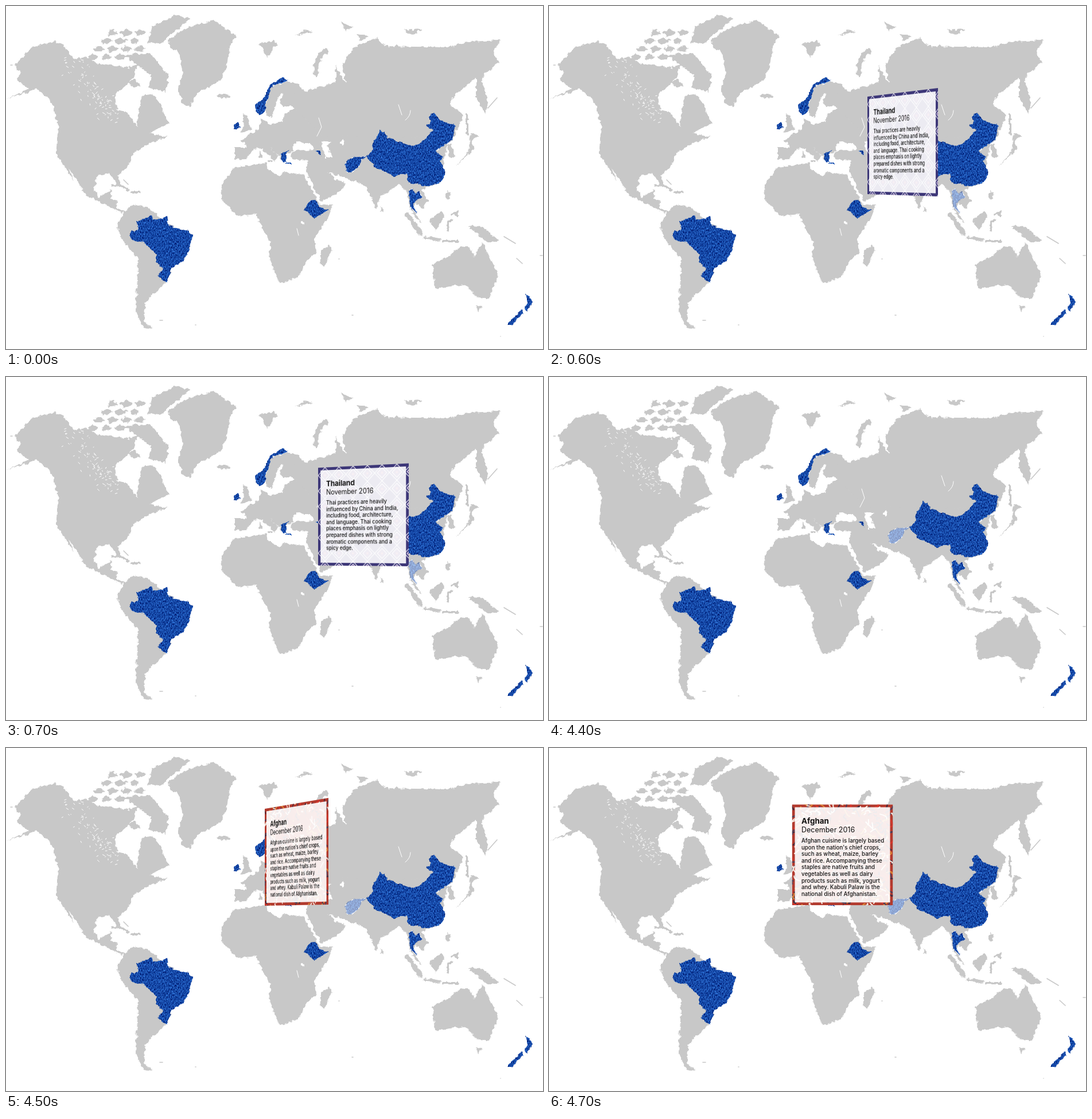
An HTML page for the animation above (8 s loop, 936 by 598 pixels).

```html
<!DOCTYPE html>
<html lang="en">
<head>
<meta charset="utf-8">
<title>World food map</title>
<style>
html, body { margin: 0; width: 100%; height: 100%; overflow: hidden; background: #fff; }
#stage { position: relative; width: 936px; height: 598px; overflow: hidden; }
#map, .card svg { position: absolute; left: 0; top: 0; width: 100%; height: 100%; }
.land { fill: #c8c8c8; }
.strip { fill: none; stroke: #c8c8c8; stroke-linecap: round; stroke-linejoin: round; }
.line { fill: none; stroke: #fff; stroke-linecap: round; }

.card {
  position: absolute; left: 0; top: 0; width: 176px; height: 176px;
  overflow: hidden; transform-origin: 0 0; opacity: 0;
  font-family: Inter, Roboto, sans-serif; color: #111;
}
.card div { position: absolute; left: 16.5px; top: 21px; white-space: nowrap; }
.card h2, .card h3, .card p { margin: 0; line-height: 16px; }
.card h2 { font-size: 13.4px; }
.card h3 { font-size: 12.5px; font-weight: 400; }
.card p { font-size: 9.7px; line-height: 11.6px; font-weight: 500; padding-top: 5px; }

#thai { animation: thai 8s step-end infinite; }
#afghan { animation: afghan 8s step-end infinite; }
#th { animation: fadeThai 8s step-end infinite; }
#af { animation: fadeAfghan 8s step-end infinite; }

@keyframes thai {
  0% { opacity: 0; }
  7.5% { opacity: 1; transform: var(--narrow); }
  8.75% { opacity: 1; transform: var(--wide); }
  10% { opacity: 1; transform: translate(532px, 153.5px); }
  55%, 100% { opacity: 0; }
}
@keyframes afghan {
  0% { opacity: 0; }
  56.25% { opacity: 1; transform: var(--narrow); }
  57.5% { opacity: 1; transform: var(--wide); }
  58.75%, 100% { opacity: 1; transform: translate(423.5px, 98.3px); }
}
@keyframes fadeThai { 0% { opacity: 1; } 6.25% { opacity: .48; } 55%, 100% { opacity: 1; } }
@keyframes fadeAfghan { 0% { opacity: 1; } 55%, 100% { opacity: .48; } }
</style>
</head>
<body>
<div id="stage">
<svg id="map" viewBox="0 0 936 598">
<defs>
  <filter id="coast" filterUnits="userSpaceOnUse" x="0" y="0" width="936" height="598" color-interpolation-filters="sRGB">
    <feTurbulence type="fractalNoise" baseFrequency=".14" numOctaves="2" seed="4" result="t"/>
    <feComponentTransfer result="n"><feFuncA type="discrete" tableValues="1"/></feComponentTransfer>
    <feDisplacementMap in="SourceGraphic" in2="n" scale="8" xChannelSelector="R" yChannelSelector="G"/>
  </filter>
  <filter id="denim" filterUnits="userSpaceOnUse" x="0" y="0" width="936" height="598" color-interpolation-filters="sRGB">
    <feTurbulence type="fractalNoise" baseFrequency=".14" numOctaves="2" seed="4"/>
    <feComponentTransfer result="n"><feFuncA type="discrete" tableValues="1"/></feComponentTransfer>
    <feDisplacementMap in="SourceGraphic" in2="n" scale="6" xChannelSelector="R" yChannelSelector="G" result="shape"/>
    <feTurbulence type="fractalNoise" baseFrequency=".75 .3" numOctaves="2" seed="9"/>
    <feColorMatrix values=".45 0 0 0 -.14  .75 0 0 0 -.09  .85 0 0 0 .23  0 0 0 0 1"/>
    <feComposite in2="shape" operator="in"/>
  </filter>
  <path id="thShape" d="M702 322L708 318 714 328 721 324 726 334 714 338 709 347 716 362 706 352Z"/>
  <path id="afShape" d="M591 274L604 264 628 262 619 268 616 279 604 290 594 290Z"/>
</defs>

<g class="land" filter="url(#coast)">
  <!-- North America -->
  <path d="M0 162L40 145 18 128 26 118 14 104 45 72 84 62 105 72 117 93 140 88 156 99 213 107 230 100 222 125 190 155 192 177 216 190 228 210 231 180 237 156 254 152 270 172 283 205 250 221 282 228 243 243 222 256 212 280 195 296 200 312 195 316 188 300 180 292 158 297 154 320 162 333 184 321 182 336 194 342 193 352 210 358 200 360 140 330 109 281 119 305 87 258 91 208 80 168 55 144Z"/>
  <!-- Arctic islands -->
  <path d="M255 36L296 16 322 22 286 50 272 65 246 64Z"/>
  <path d="M205 86L252 82 284 122 278 150 248 142 254 122 226 100Z"/>
  <path id="isles"/>
  <path d="M284 57L320 36 362 25 402 52 390 70 384 108 374 130 332 153 320 177 308 170 300 145 308 118 302 82 285 70Z"/>
  <ellipse cx="379" cy="157" rx="12" ry="5"/>
  <!-- South America -->
  <path d="M206 358L222 346 248 351 284 382 326 400 314 432 310 442 292 454 276 484 266 496 251 506 242 522 241 550 257 563 238 560 226 530 231 440 208 416 193 385Z"/>
  <!-- Africa -->
  <path d="M398 281L454 274 457 286 476 296 486 290 518 294 548 347 570 346 562 368 537 404 540 428 524 446 508 474 477 483 458 438 462 416 448 390 436 363 402 366 374 334 376 312Z"/>
  <path d="M564 416L567 426 555 455 546 448 549 428Z"/>
  <!-- Europe -->
  <path d="M399 246L420 246 410 233 440 214 446 196 458 206 482 202 486 188 540 160 620 200 580 250 548 252 530 240 504 238 502 252 488 259 487 273 458 245 475 262 468 270 446 248 432 250 418 267 399 268Z"/>
  <path d="M412 187L420 190 428 214 408 222 415 210Z"/>
  <path d="M452 176L456 192 464 194 474 160 485 150 476 166 482 175 530 170 510 136 490 131 462 142Z"/>
  <!-- Russia -->
  <path d="M500 176L500 152 516 146 508 138 520 149 576 132 574 104 592 134 586 102 608 72 646 56 662 70 772 72 806 62 860 60 850 80 858 98 829 124 840 172 835 188 820 160 820 124 778 160 774 172 797 190 778 234 700 262 560 235Z"/>
  <!-- Southern Asia -->
  <path d="M496 257L560 225 770 230 756 308 724 320 736 338 726 353 715 343 710 354 724 380 709 364 700 328 686 310 652 332 645 354 626 312 561 289 576 303 592 309 576 328 550 341 523 289 526 270 498 266Z"/>
  <path d="M768 242L775 240 784 261 774 266ZM810 222L825 226 811 234 815 250 784 278 806 254ZM655 349L658 358 653 360Z"/>
  <!-- South-east -->
  <path d="M738 373L758 358 764 366 750 392ZM767 322L775 324 773 338 767 334ZM775 362L788 357 787 368Z"/>
  <path d="M805 383L832 386 862 411 838 411Z"/>
  <!-- Australia -->
  <path d="M744 450L772 436 794 418 806 420 816 436 830 412 858 468 842 510 824 510 800 486 748 492Z"/>
  <path d="M820 522L830 523 823 534Z"/>
  <!-- Northern seas -->
  <path d="M442 66L468 59 472 66 455 91ZM584 27L606 38 592 43ZM611 49L632 52 619 61ZM693 42L728 40 706 50ZM502 52L520 42 534 44Z"/>
  <g class="strip">
    <path stroke-width="8" d="M557 79Q537 92 541 118M700 364L723 396"/>
    <path stroke-width="4" d="M184 313Q196 310 214 321M220 325h11M728 403L756 408M770 392V375h8M804 190V222M762 410h26M443 256v7M458 270h5"/>
  </g>
</g>

<g fill="#fff" filter="url(#coast)">
  <path d="M498 246L506 237 530 240 537 250 502 252Z"/>
  <path d="M550 236L566 238 561 244 568 264 556 264Z"/>
  <circle cx="585" cy="238" r="3"/><circle cx="517" cy="378" r="3"/><circle cx="751" cy="249" r="4"/>
</g>
<path class="line" d="M684 172l6 18M696 199Q705 192 705 182M545 195l5 16 -8 16M507 388l3 12"/>
<path id="lakes" class="line"/>
<path class="strip" stroke-width="1.6" d="M8 103h3M603 539h2M268 548h5M330 556h1M580 441h1M862 576h0M931 435h4M890 440l10 9M868 402l20 12M205 303l8 8M840 178l16 -18"/>

<use href="#thShape" fill="#fff"/>
<use href="#afShape" fill="#fff"/>
<g filter="url(#denim)">
  <path d="M215 402L220 392 230 390 228 376 252 365 256 374 280 368 284 384 318 392 326 400 315 434 310 444 290 456 279 482 264 470 274 458 262 446 262 432 240 412 220 408Z"/>
  <path d="M435 182L434 172 448 162 462 136 482 125 492 130 464 140 453 168 452 184 440 191Z"/>
  <path d="M628 262L640 250 638 240 654 216 666 230 706 244 722 240 744 216 732 208 740 204 738 192 746 186 758 200 784 208 778 232 748 254 762 263 756 270 767 290 756 308 734 315 702 308 698 292 678 297 644 282Z"/>
  <path d="M520 356L530 338 540 337 548 352 562 356 538 370Z"/>
  <path d="M397 207L405 202 408 212 398 216ZM540 252L546 252 550 260ZM478 258L495 251 487 259 489 272 483 273ZM488 274h8v2h-8z"/>
  <path d="M906 500L918 516 907 534 903 528 909 518ZM898 529L902 535 882 556 873 556Z"/>
  <use id="th" href="#thShape"/>
  <use id="af" href="#afShape"/>
</g>
</svg>

<div class="card" id="thai">
  <svg>
    <defs>
      <pattern id="weave" width="28" height="28" patternUnits="userSpaceOnUse">
        <path fill="#3d3778" d="M0 0h28v28H0z"/>
        <path id="gem" fill="#6a4a94" stroke="#f4f1fa" stroke-width="1.2" d="M14 5l9 9 -9 9 -9 -9z"/>
        <path fill="none" stroke="#f4f1fa" stroke-width="1.2" d="M14 0l14 14 -14 14 -14 -14z"/>
        <circle cx="14" cy="14" r="2" fill="#b9668f"/>
      </pattern>
    </defs>
    <rect width="176" height="176" fill="url(#weave)"/>
    <rect x="5" y="5" width="166" height="166" fill="#fff" fill-opacity=".9"/>
  </svg>
  <div>
    <h2>Thailand</h2>
    <h3>November 2016</h3>
    <p>Thai practices are heavily<br>influenced by China and India,<br>including food, architecture,<br>and language. Thai cooking<br>places emphasis on lightly<br>prepared dishes with strong<br>aromatic components and a<br>spicy edge.</p>
  </div>
</div>

<div class="card" id="afghan">
  <svg>
    <rect width="176" height="176" fill="#b23a2e"/>
    <g id="rug" fill="none" stroke-width="2"></g>
    <rect x="5" y="5" width="166" height="166" fill="#fff" fill-opacity=".91"/>
  </svg>
  <div>
    <h2>Afghan</h2>
    <h3>December 2016</h3>
    <p>Afghan cuisine is largely based<br>upon the nation's chief crops,<br>such as wheat, maize, barley<br>and rice. Accompanying these<br>staples are native fruits and<br>vegetables as well as dairy<br>products such as milk, yogurt<br>and whey. Kabuli Palaw is the<br>national dish of Afghanistan.</p>
  </div>
</div>
</div>

<script>
const $ = id => document.getElementById(id);
const size = 176;

// Perspective that puts the card between two upright edges: x, top, height
function lean(xl, yl, hl, xr, yr, hr) {
  const w = hl / hr;
  const a = (xr * w - xl) / size, b = (yr * w - yl) / size, g = (w - 1) / size;
  return `matrix3d(${[a, b, 0, g, 0, hl / size, 0, 0, 0, 0, 1, 0, xl, yl, 0, 1].map(v => v.toFixed(8))})`;
}
function poses(id, narrow, wide) {
  $(id).style.setProperty('--narrow', lean(...narrow));
  $(id).style.setProperty('--wide', lean(...wide));
}
poses('thai', [555, 158, 170, 678, 143, 189], [544, 158.3, 170.2, 702, 150.6, 179.5]);
poses('afghan', [451, 106, 169, 562, 87, 186], [435, 104, 171, 594, 93, 180]);

let seed = 7;
const rnd = (a, b) => {
  seed = (seed * 16807) % 2147483647;
  return Math.round(a * 10 + (b - a) * 10 * seed / 2147483647) / 10;
};

// Ragged islands north of the mainland
let isles = '';
for (let row = 0; row < 4; row++) {
  for (let x = 152 + row % 2 * 10; x < 246; x += 24) {
    const w = rnd(8, 11), h = rnd(4, 6), y = 88 - row * 14;
    if (x - 150 < row * 10) continue;
    isles += `M${x - w} ${y}l${w} ${-h} ${w} ${h} ${-w * .6} ${h} ${-w} 1z`;
  }
}
$('isles').setAttribute('d', isles + 'M212 133l12 -6 12 11 -12 4z');

// Small lakes along a diagonal band
let lakes = '';
for (let i = 0; i < 95; i++) {
  const t = rnd(0, 1);
  lakes += `M${115 + 70 * t + rnd(-20, 20)} ${105 + 85 * t + rnd(-18, 18)}l${rnd(-3, 4)} ${rnd(-2, 3)}`;
}
$('lakes').setAttribute('d', lakes);

// Rug: short curved strokes, one path per colour
const rug = $('rug');
for (const color of ['#3c2a3e', '#d9372b', '#e08c34', '#46405c', '#f6ece2']) {
  let d = '';
  for (let i = 0; i < 110; i++) {
    d += `M${rnd(0, size)} ${rnd(0, size)}q${rnd(-8, 8)} ${rnd(-8, 8)} ${rnd(-12, 12)} ${rnd(-12, 12)}`;
  }
  const path = document.createElementNS(rug.namespaceURI, 'path');
  path.setAttribute('d', d);
  path.setAttribute('stroke', color);
  rug.append(path);
}
</script>
</body>
</html>
```
